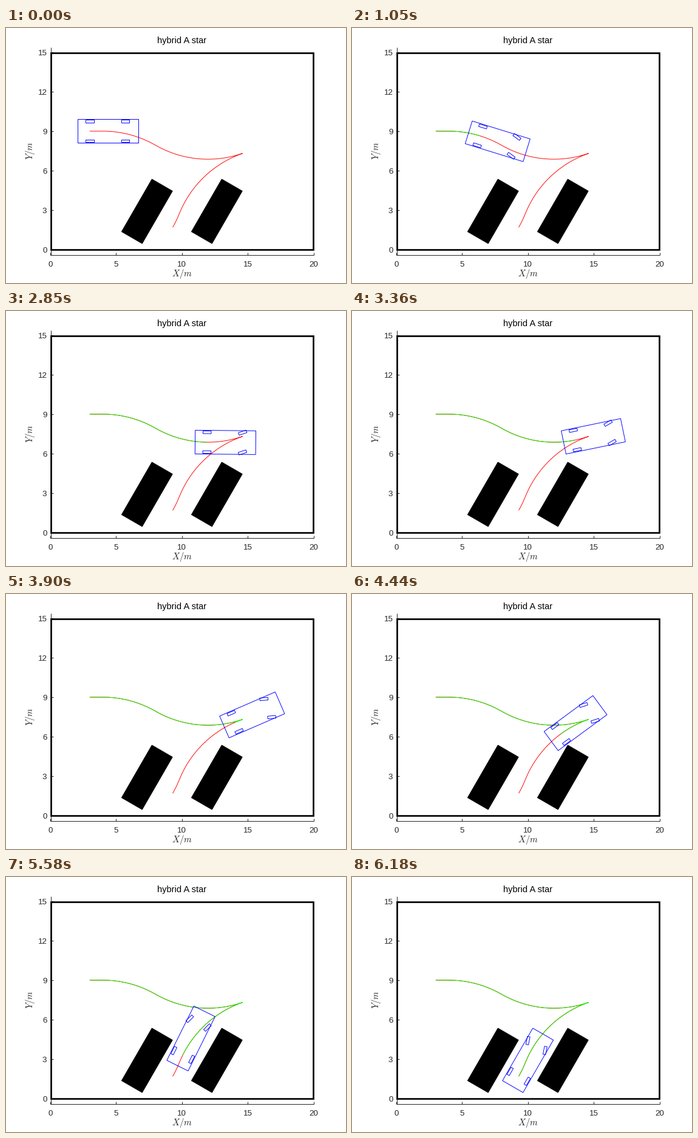
A matplotlib script for the animation above (7210 ms loop, 560 by 420 pixels).

```python
import numpy as np
import matplotlib.pyplot as plt
from matplotlib.animation import FuncAnimation
from matplotlib.patches import Polygon, Rectangle

W, H, DPI = 560, 420, 100
PT = 72 / DPI                      # points per pixel
SCALE, X0, Y0 = 21.7, 72.8, 365.2  # metres to pixels
TICK_MS, STEP_MS, LOOP_MS = 10, 30, 7210
GREY = "0.15"

WHEELBASE, RADIUS, DS = 2.7, 8.0, 0.1
REAR, FRONT, HALF = 0.9, 3.7, 0.9
STEER = np.arctan(WHEELBASE / RADIUS)

plt.rcParams["font.family"] = "Liberation Sans"
plt.rcParams["mathtext.fontset"] = "cm"


def to_px(points):
    p = np.asarray(points, float)
    return np.column_stack([X0 + SCALE * p[:, 0], Y0 - SCALE * p[:, 1]])


def place(points, x, y, angle):
    c, s = np.cos(angle), np.sin(angle)
    return np.asarray(points) @ np.array([[c, s], [-s, c]]) + (x, y)


def box(left, right, half):
    return [(left, -half), (right, -half), (right, half), (left, half)]


def drive(pose, length, gear, turn):
    """Poses along a straight line (turn 0) or an arc (left 1, right -1)."""
    x, y, a = pose
    steps = int(np.ceil(round(length / DS, 6)))
    d = gear * np.minimum(np.arange(steps + 1) * DS, length)
    if turn == 0:
        return np.column_stack([x + d * np.cos(a), y + d * np.sin(a),
                                np.full(steps + 1, a), np.zeros(steps + 1)])
    r = turn * RADIUS
    b = a + d / r
    return np.column_stack([x + r * (np.sin(b) - np.sin(a)),
                            y - r * (np.cos(b) - np.cos(a)),
                            b, np.full(steps + 1, turn * STEER)])


def plan():
    dip, cusp, peak, goal = np.radians([29.9, 19.15, 68.19, 60])
    moves = [(1.0, 1, 0),
             (RADIUS * dip, 1, -1),
             (RADIUS * (dip + cusp), 1, 1),
             (RADIUS * (peak - cusp), -1, -1),
             (RADIUS * (peak - goal), -1, 1)]
    pose, parts = (3, 9, 0), []
    for move in moves:
        parts.append(drive(pose, *move))
        pose = parts[-1][-1, :3]
    return np.vstack(parts)


path = plan()
track = to_px(path[:, :2])
body = box(-REAR, FRONT, HALF)
wheel = box(-0.31, 0.31, 0.1)

fig = plt.figure(figsize=(W / DPI, H / DPI), dpi=DPI, facecolor="white")
ax = fig.add_axes([0, 0, 1, 1])
ax.set_xlim(0, W)
ax.set_ylim(H, 0)
ax.axis("off")


def line(xs, ys, color, width=1, z=2):
    return ax.plot(xs, ys, color=color, lw=width * PT, zorder=z,
                   solid_capstyle="butt")[0]


def label(x, y, s, size, color=GREY, **kw):
    ax.text(x, y, s, fontsize=size * PT, color=color, **kw)


# Axes, ticks and labels
line([73.5, 73.5], [31.5, 374], GREY)
line([73, 507], [373.5, 373.5], GREY)
for v in range(0, 21, 5):
    x = X0 + SCALE * v
    line([x, x], [369.5, 374], GREY)
    label(x, 393, str(v), 13.33, ha="center", va="baseline")
for v in range(0, 16, 3):
    y = Y0 - SCALE * v
    line([73, 77.5], [y, y], GREY)
    label(67.5, y + 5.3, str(v), 13.33, ha="right", va="baseline")
label(290, 25, "hybrid A star", 14.67, "black", ha="center", va="baseline")
label(290, 405, "$X/m$", 14.67, ha="center", va="center")
label(40, 202, "$Y/m$", 14.67, rotation=90, ha="center", va="center")

# Walls and parked cars
ax.add_patch(Rectangle((73.5, 40.5), 432.5, 324, fill=False,
                       ec="black", lw=2.67 * PT, zorder=3))
for side in (-2.65, 2.65):
    parked = place(body, 9.3 + side, 1.7, np.radians(60))
    ax.add_patch(Polygon(to_px(parked), fc="black", ec="black", lw=PT))

line(track[:, 0], track[:, 1], "#ff0000", 0.95, 4)
done = line([], [], "#00ff00", 0.95, 5)


def outline():
    patch = Polygon([(0, 0), (1, 1), (1, 0)], fill=False, ec="#0000ff",
                    lw=0.95 * PT, zorder=6, joinstyle="miter")
    return ax.add_patch(patch)


car = outline()
wheels = [(outline(), x, y) for x in (0, WHEELBASE) for y in (-0.75, 0.75)]


def update(i):
    k = min(i * TICK_MS // STEP_MS, len(path) - 1)
    x, y, angle, steer = path[k]
    done.set_data(track[:k + 1, 0], track[:k + 1, 1])
    car.set_xy(to_px(place(body, x, y, angle)))
    for patch, wx, wy in wheels:
        shape = place(wheel, wx, wy, steer if wx else 0)
        patch.set_xy(to_px(place(shape, x, y, angle)))
    return [done, car] + [w[0] for w in wheels]


anim = FuncAnimation(fig, update, frames=LOOP_MS // TICK_MS, interval=TICK_MS,
                     init_func=lambda: update(0), repeat=True, repeat_delay=0)
plt.show()
```
